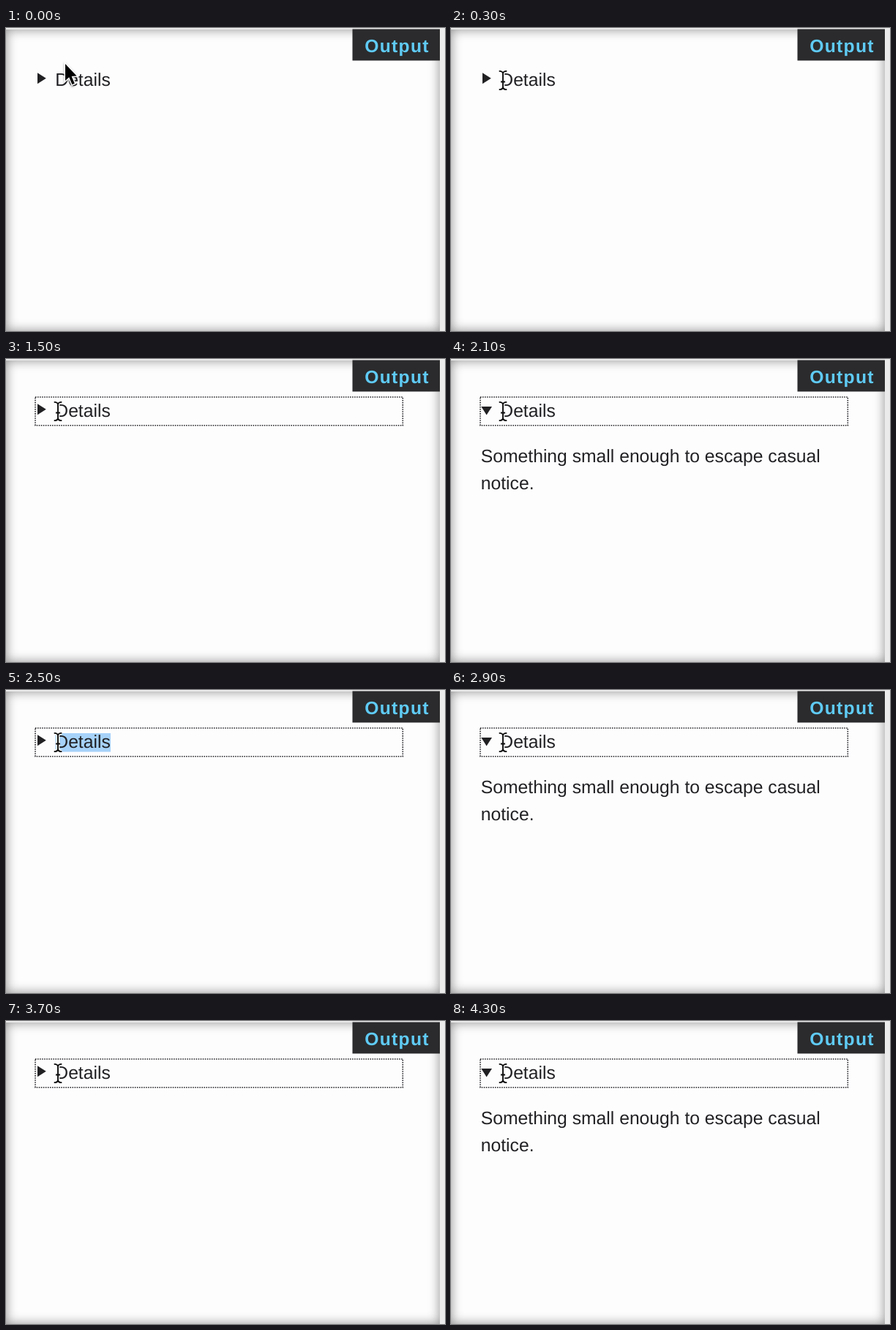
An HTML page with a canvas for the animation above (4.7 s loop, 600 by 414 pixels).

```html
<!DOCTYPE html>
<html lang="en">
<head>
<meta charset="utf-8">
<title>Details toggle</title>
<style>
  html, body { margin: 0; width: 100%; height: 100%; overflow: hidden; background: #ebebeb; }
  .panel {
    position: absolute; left: 0; top: 1.5px; width: 592.5px; height: 412.5px;
    background: #fefdfe; box-shadow: inset 0 0 15.3px #8c8c8c;
  }
  canvas { position: absolute; left: 0; top: 0; }
</style>
</head>
<body>
<div class="panel"></div>
<canvas width="600" height="414"></canvas>
<script>
const ctx = document.querySelector('canvas').getContext('2d');
const LOOP = 4700;
const INK = '#212124';
const FONT = '"Liberation Sans", Arial, sans-serif';

// Clicks that toggle the disclosure, in ms
const CLICKS = [700, 1500, 2100, 2500, 2800, 3700, 4300];
const SELECTED = [2500, 2800];

// Pointer path: the arrow turns into a text cursor over the summary
const POINTER = [
  { at: 0, x: 81, y: 49, shape: drawArrow },
  { at: 100, x: 77, y: 63, shape: drawBeam },
  { at: 200, x: 72, y: 69.5, shape: drawBeam },
  { at: 300, x: 71, y: 71.5, shape: drawBeam }
];

function poly(points) {
  ctx.beginPath();
  points.forEach(([x, y]) => ctx.lineTo(x, y));
  ctx.closePath();
}

function text(str, x, y, color = INK, weight = 'normal', spacing = 0) {
  ctx.font = `${weight} 24.7px ${FONT}`;
  ctx.letterSpacing = spacing + 'px';
  ctx.textRendering = 'geometricPrecision';
  ctx.fillStyle = color;
  ctx.fillText(str, x, y);
}

function drawTab() {
  ctx.fillStyle = '#2b2b2d';
  ctx.fillRect(473.5, 1.5, 119.5, 43);
  text('Output', 490.2, 32.6, '#5fcbf5', 'bold', 1.3);
}

function drawFocus() {
  ctx.save();
  ctx.strokeStyle = INK;
  ctx.lineWidth = 1.6;
  ctx.setLineDash([1.55, 1.5]);
  ctx.strokeRect(40, 52, 502.3, 38.7);
  ctx.restore();
}

function drawMarker(open) {
  poly(open
    ? [[41.3, 65], [56, 65], [48.6, 76.6]]
    : [[43, 61.3], [54.8, 68.8], [43, 76.3]]);
  ctx.fillStyle = INK;
  ctx.fill();
}

function drawArrow() {
  ctx.save();
  poly([[0, 0], [0, 23], [5.2, 18.2], [9.4, 28.2], [12.8, 26.8], [8.6, 17], [15.6, 16.4]]);
  ctx.shadowColor = 'rgba(0,0,0,.35)';
  ctx.shadowBlur = 3;
  ctx.shadowOffsetY = 1.5;
  ctx.lineWidth = 3;
  ctx.strokeStyle = '#fff';
  ctx.stroke();
  ctx.restore();
  ctx.fillStyle = '#000';
  ctx.fill();
}

function drawBeam() {
  ctx.beginPath();
  for (const s of [-1, 1]) {
    ctx.moveTo(-5.3, 12.6 * s);
    ctx.quadraticCurveTo(-0.6, 12.6 * s, 0, 9.5 * s);
    ctx.quadraticCurveTo(0.6, 12.6 * s, 5.3, 12.6 * s);
  }
  ctx.moveTo(0, -10);
  ctx.lineTo(0, 10);
  ctx.moveTo(-3, 2);
  ctx.lineTo(3, 2);
  for (const [color, width] of [['#fff', 4.4], ['#0c0c0c', 1.9]]) {
    ctx.strokeStyle = color;
    ctx.lineWidth = width;
    ctx.stroke();
  }
}

function drawPointer(t) {
  const p = POINTER.filter(step => step.at <= t).pop();
  ctx.save();
  ctx.translate(p.x, p.y);
  p.shape();
  ctx.restore();
}

function render(t) {
  const clicks = CLICKS.filter(at => at <= t).length;
  const open = clicks % 2 === 1;

  ctx.clearRect(0, 0, 600, 414);
  drawTab();
  if (clicks) drawFocus();
  if (t >= SELECTED[0] && t < SELECTED[1]) {
    ctx.fillStyle = '#a6d2f9';
    ctx.fillRect(67.5, 59, 75.5, 25.5);
  }
  drawMarker(open);
  text('Details', 67.3, 79.2);
  if (open) {
    text('Something small enough to escape casual', 40.8, 140.6);
    text('notice.', 40.8, 177.5);
  }
  drawPointer(t);
}

const start = performance.now();
function tick() {
  render((performance.now() - start) % LOOP);
  requestAnimationFrame(tick);
}
tick();
</script>
</body>
</html>
```
